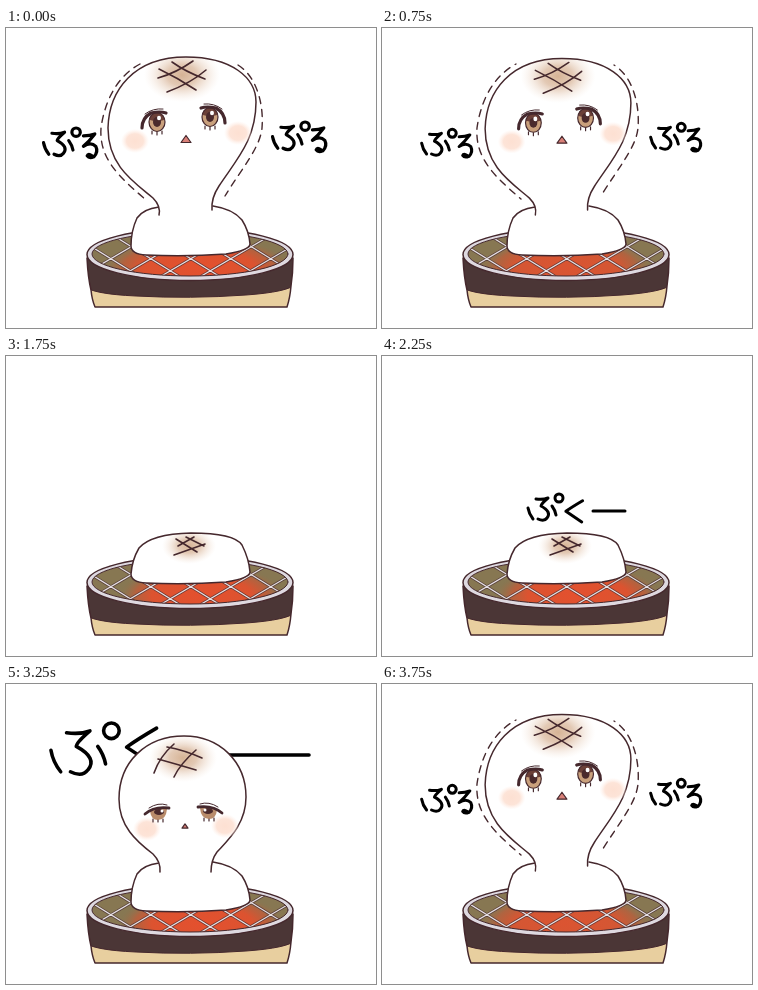
Write an HTML page with a canvas that moves like this. It is 370 by 300 pixels and loops after 4 s.

```html
<!DOCTYPE html>
<html lang="ja">
<head>
<meta charset="utf-8">
<style>
html, body { margin: 0; width: 100%; height: 100%; overflow: hidden; background: #fff; }
canvas { display: block; }
</style>
</head>
<body>
<canvas id="stage" width="370" height="300"></canvas>
<script>
const ctx = document.getElementById('stage').getContext('2d');
const INK = '#45282d';
const STEP = 250;
const P = d => new Path2D(d);

// Lettering, each glyph in its own small box
const PU = P('M1 14Q2 20 6 25M9 5Q16 6 21 4Q14 10 14 12Q25 18 20 24Q17 28 11 25M25 12Q28 16 29 21M28 4a4 4 0 1 0 8 0a4 4 0 1 0-8 0');
const KU = P('M20 2Q8 9 1 14Q10 20 19 26');
const RU = P('M2 3Q9 3 14 1Q8 9 2 14Q10 9 15 14Q18 20 13 25Q8 27 6 24Q7 21 11 24');
const SHI = P('M51 155Q46 174 50 177Q54 179 59 171');
const YUN = P('M64 164Q62 171 65 176Q65 165 72 165Q79 168 74 173Q70 174 69 171M72 161Q74 172 68 180M91 160Q86 170 81 180Q88 168 92 172Q91 181 96 179Q100 178 103 171M111 166h1M118 165h1M126 164h1');

const BASE = P('M153 179Q137 181 131 190Q125 203 125 218Q125 226 140 227Q180 229 220 226Q244 222 244 216Q243 203 236 192Q227 181 207 178');

const BODY = {
  full: {
    head: P('M153 187Q155 178 147 170C128 154 102 138 102 100C103 62 128 29 180 29C226 29 250 50 250 74C250 112 230 132 213 158Q205 170 206 182'),
    scorch: [176, 47, 38, 27],
    marks: P('M152 50Q170 45 187 33M161 64Q185 55 200 42M153 41Q172 50 190 62M166 34Q180 44 199 51'),
    cheeks: [[129, 113], [232, 105]], mouth: [180, 111, 5]
  },
  mid: {
    head: P('M154 188Q155 178 147 170C130 157 113 142 113 115C113 78 140 52 178 52C214 52 240 78 240 113C240 140 222 156 211 168Q205 176 205 188'),
    scorch: [177, 74, 34, 24],
    marks: P('M148 89Q154 72 168 60M168 93Q174 80 190 66M161 63Q178 66 196 74M152 75Q170 80 190 86'),
    cheeks: [[141, 145], [219, 142]], mouth: [179, 142, 3]
  },
  small: {
    head: P('M155 187Q148 178 148 168C148 154 160 146 177 146C194 146 203 156 203 168Q203 178 200 187'),
    scorch: [175, 157, 26, 16],
    marks: P('M163 154L182 164M173 150L188 160M163 166L188 153M164 159L181 150')
  },
  flat: {
    head: P('M125 218Q126 204 133 192Q145 178 185 177Q228 177 236 189Q243 203 244 216Q244 222 220 226Q180 229 140 227Q125 226 125 218Z'),
    scorch: [183, 190, 27, 18],
    marks: P('M170 183L191 196M180 181L198 190M168 199L199 188M172 190L188 181')
  }
};

const POSES = 'full full full full mid small flat flat flat flat flat small small mid mid full'.split(' ');
// Ember glow: centre x, horizontal radius, strength
const GLOWS = { w: [192, 95, 1], d: [184, 88, .9], m: [196, 84, 1] };
const EMBERS = 'wdwdwmdmmmwmwmwd';

// Swelling word: pu x, y, scale; ku x, y, scale; bar start, end, y
const SWELL = {
  9: [145, 138, 1, 183, 143, .88, 211, 243, 155],
  10: [129, 130, 1.15, 174, 134, 1, 203, 251, 146],
  11: [111, 117, 1.36, 165, 121, 1.12, 195, 259, 136],
  12: [77, 93, 1.6, 146, 96, 1.3, 190, 262, 113],
  13: [43, 39, 1.95, 119, 41, 1.58, 215, 303, 71]
};

function stroke(path, width = 1.5, color = INK) {
  ctx.lineWidth = width;
  ctx.strokeStyle = color;
  ctx.stroke(path);
}

function fill(path, color) {
  ctx.fillStyle = color;
  ctx.fill(path);
}

function glyph(path, x, y, scale, width) {
  ctx.save();
  ctx.translate(x, y);
  ctx.scale(scale, scale);
  stroke(path, width / scale, '#000');
  ctx.restore();
}

function glow(x, y, rx, ry, stops) {
  ctx.save();
  ctx.translate(x, y);
  ctx.scale(rx, ry);
  const g = ctx.createRadialGradient(0, 0, 0, 0, 0, 1);
  stops.forEach(([at, color]) => g.addColorStop(at, color));
  ctx.fillStyle = g;
  ctx.fillRect(-1, -1, 2, 2);
  ctx.restore();
}

function oval(cx, cy, rx, ry) {
  const path = new Path2D();
  path.ellipse(cx, cy, rx, ry, 0, 0, Math.PI * 2);
  return path;
}

const STOVE = P('M81 230Q82 250 85 262Q86 272 89 279L281 279Q284 270 285 258Q287 245 287 230Z');
const BAND = P('M78 225V258Q86 266 130 268Q184 271 240 267Q282 264 290 256V225Z');
const RIM = oval(184, 226.5, 103, 26);
const BED = oval(184, 226, 98, 22);

function drawStove(kind) {
  fill(STOVE, '#e8cf9f');
  ctx.save();
  ctx.clip(STOVE);
  fill(BAND, '#4b3636');
  stroke(BAND, 1, INK);
  ctx.restore();
  stroke(STOVE);
  fill(RIM, '#ded9e0');
  stroke(RIM);

  ctx.save();
  ctx.clip(BED);
  fill(BED, '#877752');
  const [x, radius, strength] = GLOWS[kind];
  ctx.globalAlpha = strength;
  glow(x, 240, radius, 32, [[0, '#e4502e'], [.6, '#dc5330'], [.8, 'rgba(194,91,56,.75)'], [1, 'rgba(135,119,82,0)']]);
  ctx.globalAlpha = 1;
  const wires = new Path2D();
  for (let wx = 20; wx < 330; wx += 40) {
    wires.moveTo(wx, 203);
    wires.lineTo(wx + 76, 250);
    wires.moveTo(wx + 12, 203);
    wires.lineTo(wx - 68, 250);
  }
  stroke(wires, 2.8, 'rgba(75,50,52,.75)');
  stroke(wires, 1.2, '#e6e0e4');
  ctx.restore();
  stroke(BED, 1);
}

// Eyes are drawn for the left side; side -1 mirrors them
function openEye(x, y, side) {
  ctx.save();
  ctx.translate(x, y);
  ctx.scale(side, 1);
  const iris = oval(0, 0, 8, 9.5);
  fill(iris, '#c9a07c');
  ctx.save();
  ctx.clip(iris);
  fill(P('M-10 -12H10V-3Q0 1 -10 -3Z'), '#6b4038');
  fill(oval(0, 0, 4, 5), '#4a2a2c');
  ctx.restore();
  stroke(iris, 1.2);
  fill(oval(2 * side, -4, 2, 2.3), '#fff');
  stroke(P('M-15 6Q-15 -4 -6 -9Q3 -11 9 -9'), 3.2);
  stroke(P('M-12 -8Q-4 -14 6 -13'), 1);
  stroke(P('M-5 9v3M0 10v3M5 9v3'), 1.2);
  ctx.restore();
}

function sleepyEye(x, y, side) {
  ctx.save();
  ctx.translate(x, y);
  ctx.scale(side, 1);
  fill(P('M-8 -1Q0 -5 9 -3Q8 8 0 8Q-7 8 -8 -1Z'), '#b98c6b');
  fill(oval(1, 0, 5, 3), '#4a2a2c');
  fill(oval(4, -1, 1.5, 1.5), '#fff');
  stroke(P('M-13 2Q-4 -6 11 -4'), 2.8);
  stroke(P('M-9 -4Q0 -10 9 -7'), 1);
  stroke(P('M-5 7v3M0 8v2M5 7v3'), 1.2);
  ctx.restore();
}

function drawFace(pose, { cheeks, mouth }) {
  if (pose === 'small') {
    stroke(P('M168 177q3 -1 5 0M180 176q3 -1 5 0M176.5 180h2'), 1.4);
    return;
  }
  if (!mouth) return;
  for (const [x, y] of cheeks) {
    glow(x, y, 14, 12, [[0, '#fde0d2'], [.6, '#fde4d8'], [1, 'rgba(255,238,230,0)']]);
  }
  if (pose === 'full') {
    openEye(151, 94, 1);
    openEye(204, 89, -1);
  } else {
    sleepyEye(152, 128, 1);
    sleepyEye(203, 127, -1);
  }
  const [x, y, r] = mouth;
  const lips = P(`M${x} ${y - r * .7}L${x + r} ${y + r * .7}H${x - r}Z`);
  fill(lips, '#d98078');
  stroke(lips, 1.2);
}

function drawMochi(pose, squeezed) {
  const body = BODY[pose];
  if (pose !== 'flat') {
    fill(BASE, '#fff');
    stroke(BASE);
  }
  ctx.save();
  if (squeezed) {
    ctx.translate(177, 180);
    ctx.scale(.985, .99);
    ctx.translate(-177, -180);
  }
  fill(body.head, '#fff');
  ctx.save();
  ctx.clip(body.head);
  glow(...body.scorch, [[0, '#d6b395'], [.4, 'rgba(222,192,168,.85)'], [1, 'rgba(245,230,218,0)']]);
  ctx.restore();
  stroke(body.head);
  stroke(body.marks, 1.6);
  drawFace(pose, body);
  ctx.restore();
}

const SHIVER = P('M134 36C108 50 98 78 95 100C93 130 112 148 139 171M232 37C250 48 258 75 256 100C254 120 236 140 219 168');

function drawShiver(squeezed) {
  ctx.save();
  ctx.setLineDash([7, 6]);
  ctx.lineDashOffset = squeezed ? 6 : 0;
  stroke(SHIVER, 1.4);
  ctx.restore();
  for (const [x, y] of [[64.5, 114], [293.5, 108]]) {
    ctx.save();
    ctx.translate(x + (squeezed ? .5 : 0), y + (squeezed ? .5 : 0));
    if (squeezed) ctx.scale(.94, .94);
    glyph(PU, -28, -14, 1.05, 3.2);
    glyph(RU, 11, -9, .95, 3.2);
    ctx.restore();
  }
}

function drawSwell([px, py, ps, kx, ky, ks, from, to, y]) {
  const width = 2.4 + ps * .6;
  glyph(PU, px, py, ps, width);
  glyph(KU, kx, ky, ks, width);
  stroke(P(`M${from} ${y}H${to}`), width, '#000');
}

function draw(now) {
  const step = Math.floor(now / STEP) % POSES.length;
  const pose = POSES[step];
  const squeezed = pose === 'full' && step % 2 === 1;
  ctx.fillStyle = '#fff';
  ctx.fillRect(0, 0, 370, 300);
  ctx.lineCap = ctx.lineJoin = 'round';

  if (pose === 'full') drawShiver(squeezed);
  if (SWELL[step]) drawSwell(SWELL[step]);
  if (step >= 4 && step <= 6) stroke(SHI, 3, '#000');
  if (step === 5 || step === 6) stroke(YUN, 3, '#000');
  drawStove(EMBERS[step]);
  drawMochi(pose, squeezed);
}

const start = performance.now();
function loop() {
  draw(performance.now() - start);
  requestAnimationFrame(loop);
}
loop();
</script>
</body>
</html>
```
